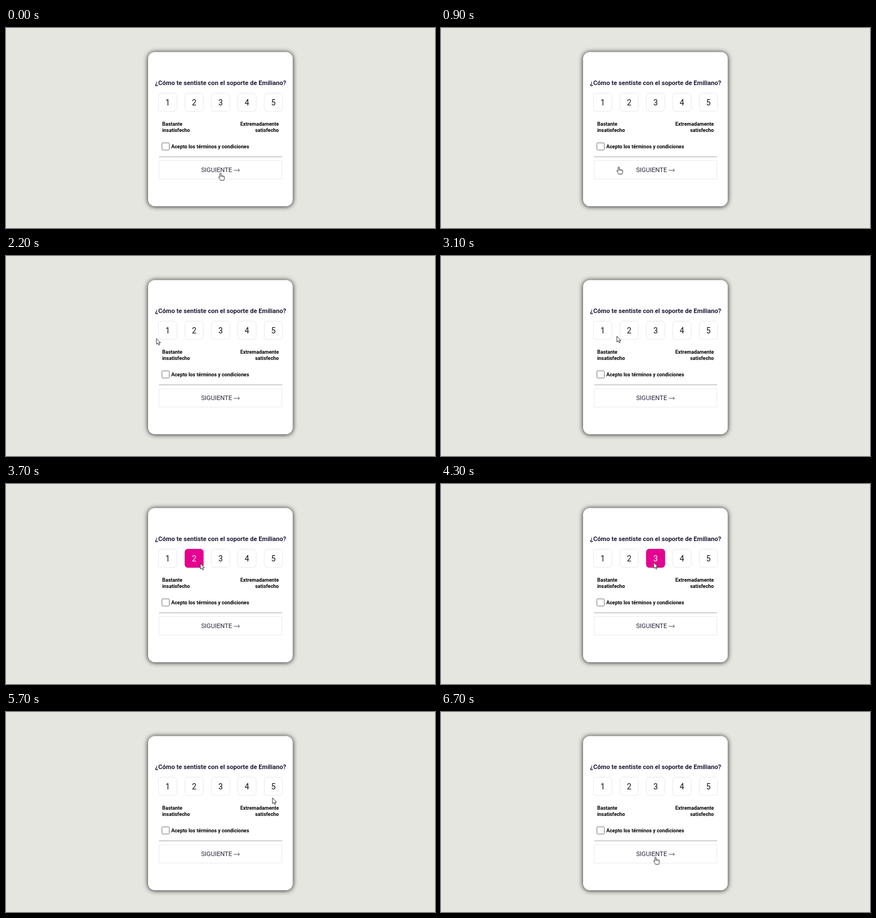
These frames come from a looping animation (758 px wide and 354 px high, 7500 ms). An HTML page with a canvas:

```html
<!DOCTYPE html>
<html lang="es">
<head>
<meta charset="utf-8">
<title>Encuesta</title>
<style>
  html, body { margin: 0; width: 100%; height: 100%; overflow: hidden; background: #e6e6e0; }
  canvas { display: block; width: 758px; height: 354px; }
</style>
</head>
<body>
<canvas id="stage" width="758" height="354"></canvas>
<script>
const ctx = document.getElementById('stage').getContext('2d');
const LOOP = 7500, STEP = 100;
const FONT = 'Roboto, "Liberation Sans", sans-serif';
const BOX = { x: 269, y: 114.8, gap: 46.7, size: 33.4 };
const NEXT = { x: 270.5, y: 234.5, w: 217, h: 33 };

// pointer tip: time, x, y
const PATH = [
  [0, 379, 257], [100, 379, 257], [200, 377, 255], [300, 377, 255],
  [900, 314, 246], [1100, 293.5, 245], [1900, 263.5, 173], [2200, 265.8, 146],
  [2300, 269.5, 142.5], [2700, 291, 141], [3100, 310.8, 142], [4300, 375.8, 139],
  [4700, 448, 141], [4800, 448, 141], [5600, 470, 143], [5700, 470.8, 152],
  [6400, 384, 238], [6700, 379, 257], [LOOP, 379, 257]
];

function pointerAt(t) {
  const i = Math.max(1, PATH.findIndex(p => p[0] >= t));
  const [t0, x0, y0] = PATH[i - 1], [t1, x1, y1] = PATH[i];
  const k = (t - t0) / (t1 - t0);
  return { x: x0 + (x1 - x0) * k, y: y0 + (y1 - y0) * k };
}

function inside(p, x, y, w, h) {
  return p.x >= x && p.x <= x + w && p.y >= y && p.y <= y + h;
}

function text(str, x, y, size, weight, color, align = 'left') {
  ctx.font = `${weight} ${size}px ${FONT}`;
  ctx.fillStyle = color;
  ctx.textAlign = align;
  ctx.fillText(str, x, y);
}

function panel(x, y, w, h, r, fill, stroke) {
  ctx.beginPath();
  ctx.roundRect(x, y, w, h, r);
  ctx.fillStyle = fill;
  ctx.fill();
  if (stroke) {
    ctx.strokeStyle = stroke;
    ctx.lineWidth = 1;
    ctx.stroke();
  }
}

function line(points, color, width) {
  ctx.beginPath();
  points.forEach(([x, y]) => ctx.lineTo(x, y));
  ctx.strokeStyle = color;
  ctx.lineWidth = width;
  ctx.stroke();
}

function card() {
  ctx.fillStyle = '#e6e6e0';
  ctx.fillRect(0, 0, 758, 354);
  ctx.save();
  ctx.shadowColor = 'rgba(0,0,0,.92)';
  ctx.shadowBlur = 8;
  ctx.shadowOffsetY = 0.5;
  panel(251, 42.5, 255.7, 273, 12, '#fff');
  ctx.restore();
}

function scores(p) {
  for (let i = 0; i < 5; i++) {
    const x = BOX.x + i * BOX.gap, s = BOX.size;
    const hot = inside(p, x, BOX.y, s, s);
    panel(x + 0.5, BOX.y + 0.5, s - 1, s - 1, 5,
      hot ? '#e6008f' : '#fff', hot ? '#c8007d' : '#e9e9ee');
    text(String(i + 1), x + s / 2, 137, 14, 400, hot ? '#fff' : '#111', 'center');
  }
}

function form() {
  text('¿Cómo te sentiste con el soporte de Emiliano?', 379.2, 101, 11.15, 700, '#1d1d35', 'center');
  text('Bastante', 276, 173.2, 8.9, 700, '#000');
  text('insatisfecho', 276, 183.8, 8.9, 700, '#000');
  text('Extremadamente', 482, 173.2, 8.9, 700, '#000', 'right');
  text('satisfecho', 482, 183.8, 8.9, 700, '#000', 'right');
  panel(275.5, 203.3, 13, 12.7, 1.5, '#fff', '#777');
  text('Acepto los términos y condiciones', 292, 212.8, 8.9, 700, '#000');
  line([[270.5, 228], [488, 228]], '#a2a2a2', 1.1);
  panel(NEXT.x, NEXT.y, NEXT.w, NEXT.h, 0, '#fff', '#ececec');
  text('SIGUIENTE', 344.7, 255.2, 11.15, 400, '#25253b');
  line([[402.5, 251.9], [412.5, 251.9]], '#25253b', 0.8);
  line([[409.8, 249.2], [412.6, 251.9], [409.8, 254.6]], '#25253b', 0.8);
}

const ARROW = new Path2D('M0 0V10.2L2.4 8.1L4 11.7L5.7 11L4.2 7.5H7.3Z');
const HAND = new Path2D('M-1.1 7.2V.9C-1.1-.4 1.1-.4 1.1.9V4.6C1.6 3.8 3 4 3.2 5' +
  'C3.8 4.3 5 4.6 5.2 5.5C5.9 5 7 5.4 7 6.5V9C7 10.6 6 11 5.8 12.7H0' +
  'C-.3 11-2.1 9.4-3.3 7.5C-3.8 6.4-2.4 5.7-1.1 7.2Z');

function pointer(p) {
  const hand = inside(p, NEXT.x, NEXT.y, NEXT.w, NEXT.h);
  ctx.save();
  ctx.translate(p.x, p.y);
  ctx.lineJoin = 'round';
  ctx.lineWidth = 0.9;
  ctx.strokeStyle = '#222';
  ctx.fillStyle = '#fff';
  const shape = hand ? HAND : ARROW;
  ctx.fill(shape);
  ctx.stroke(shape);
  if (hand) {
    line([[1.1, 4.6], [1.1, 6.8]], '#222', 0.7);
    line([[3.2, 5], [3.2, 7]], '#222', 0.7);
    line([[5.2, 5.5], [5.2, 7.2]], '#222', 0.7);
  }
  ctx.restore();
}

function draw() {
  const t = Math.floor(performance.now() % LOOP / STEP) * STEP;
  const p = pointerAt(t);
  card();
  scores(p);
  form();
  pointer(p);
  requestAnimationFrame(draw);
}
draw();
</script>
</body>
</html>
```
